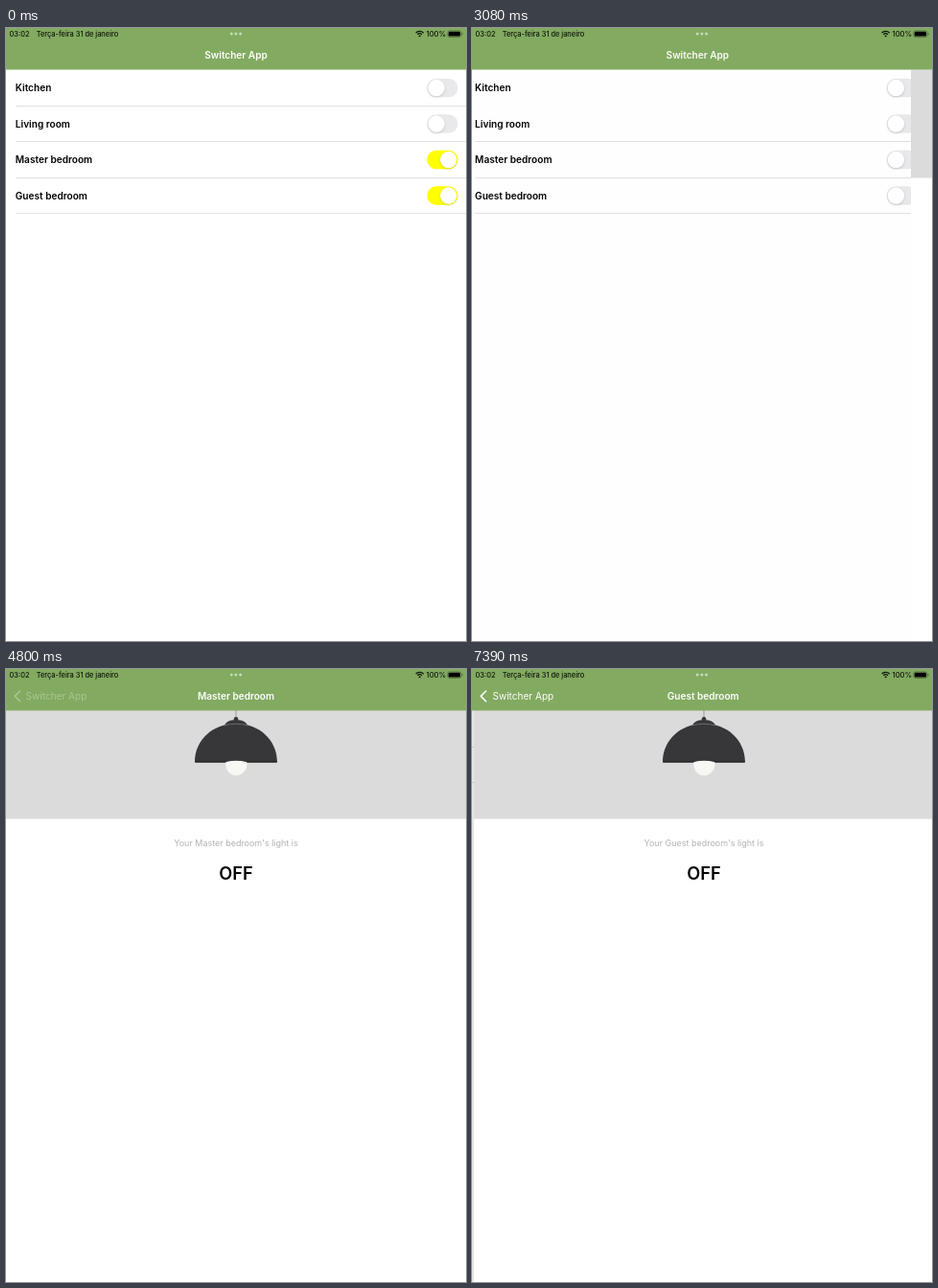
An HTML page with a canvas that plays this animation: 480x640 px, repeating every 8000 ms.

```html
<!DOCTYPE html>
<html lang="en">
<head>
<meta charset="utf-8">
<title>Switcher App</title>
<style>
html, body { margin: 0; width: 100%; height: 100%; overflow: hidden; background: #fff; }
canvas { display: block; width: 480px; height: 640px; }
</style>
</head>
<body>
<canvas id="stage"></canvas>
<script>
const W = 480, H = 640, LOOP = 8000, BAR = 43.5, ROW = 37.5;
const FONT = 'Inter, Roboto, sans-serif';
const GREEN = '#82aa60';
const rooms = ['Kitchen', 'Living room', 'Master bedroom', 'Guest bedroom'];
const startsOn = [0, 0, 1, 1];

const ticks = [0, 500, 620, 740, 860, 1090, 1200, 1310, 1420, 1530, 1640,
  1790, 1910, 2010, 2120, 2220, 2740, 2850, 2960, 3070, 3190, 3300,
  3570, 3690, 3790, 3900, 4010, 4120, 4800, 4950, 5060, 5180, 5290, 5410,
  5860, 5960, 6070, 6180, 6290, 6390, 6500, 6600, 6930, 7040, 7160, 7270, 7390];

const visits = [
  { room: 0, select: 1790, push: 1786, tap: 2740, pop: 2800, end: 3300 },
  { room: 2, select: 3570, push: 3605, tap: 4800, pop: 4900, end: 5410 },
  { room: 3, select: 6930, push: 6960, tap: 9e3, pop: 9e3, end: 9e3 }
];

const toggles = [
  { row: 3, touch: 460, slide: 580, on: 0 },
  { row: 2, touch: 1050, slide: 1270, on: 0 },
  { row: 2, touch: 5860, slide: 6240, on: 1 }
];

const canvas = document.getElementById('stage');
const ctx = canvas.getContext('2d');
const dpr = window.devicePixelRatio || 1;
canvas.width = W * dpr;
canvas.height = H * dpr;

const clamp = v => Math.max(0, Math.min(1, v));
const smooth = v => { v = clamp(v); return v * v * (3 - 2 * v); };
const mix = (a, b, k) => a + (b - a) * k;

function spring(ms) {
  if (ms <= 0) return 0;
  const w = ms * 0.0179;
  const v = 1 - (1 + w) * Math.exp(-w);
  return v > 0.9985 ? 1 : v;
}

function text(str, x, y, size, weight, color, align = 'left', alpha = 1) {
  ctx.save();
  ctx.globalAlpha = clamp(alpha);
  ctx.font = `${weight} ${size}px ${FONT}`;
  ctx.textAlign = align;
  ctx.fillStyle = color;
  ctx.fillText(str, x, y);
  ctx.restore();
}

function rect(x, y, w, h, color) {
  ctx.fillStyle = color;
  ctx.fillRect(x, y, w, h);
}

function pill(x, y, w, h, r, color) {
  ctx.beginPath();
  ctx.roundRect(x, y, w, h, r);
  ctx.fillStyle = color;
  ctx.fill();
}

function switchState(row, t) {
  let on = startsOn[row], stretch = 0;
  for (const g of toggles) {
    if (g.row !== row || t < g.touch) continue;
    on = mix(on, g.on, smooth((t - g.slide) / 260));
    stretch = clamp((t - g.touch) / 120) * (1 - smooth((t - g.slide - 100) / 160));
  }
  return { on, stretch };
}

function drawSwitch(cy, { on, stretch }) {
  const x = 439.3, w = 32.2, h = 19.6, d = 17.4, pad = 1.1;
  const c = [mix(233, 255, on), mix(233, 255, on), mix(235, 0, on)].map(Math.round);
  pill(x, cy - h / 2, w, h, h / 2, `rgb(${c})`);
  const kw = d + 4 * stretch;
  ctx.save();
  ctx.shadowColor = 'rgba(0,0,0,.16)';
  ctx.shadowBlur = 2.5 * dpr;
  ctx.shadowOffsetY = 1 * dpr;
  pill(mix(x + pad, x + w - pad - kw, on), cy - d / 2, kw, d, d / 2, '#fff');
  ctx.restore();
}

function hiddenLines(t) {
  const v = visits.find(v => t >= v.select && t < v.end);
  const row = v ? v.room : t >= 5860 && t < 6930 ? 2 : -9;
  return [row - 1, row];
}

function drawList(t, p) {
  const hidden = hiddenLines(t);
  ctx.save();
  ctx.translate(-0.3 * W * p, 0);
  rooms.forEach((name, i) => {
    const cy = BAR + ROW * (i + 0.5) + 0.3;
    text(name, 9.8, cy + 3.6, 10.1, 600, '#000');
    drawSwitch(cy, switchState(i, t));
    if (!hidden.includes(i)) rect(10, Math.floor(BAR + ROW * (i + 1)), W + 150, 1, '#e0e0e0');
  });
  ctx.restore();
  if (p > 0) rect(0, BAR, W, H, `rgba(0,0,0,${0.1 * p})`);
}

function drawLamp() {
  rect(239.6, 43, 0.8, 8, '#8a8a8a');
  ctx.fillStyle = '#37373a';
  ctx.beginPath();
  ctx.arc(240, 52.3, 2.3, 0, 7);
  ctx.fill();
  ctx.beginPath();
  ctx.moveTo(228, 58.5);
  ctx.quadraticCurveTo(231, 53.4, 237, 53.2);
  ctx.lineTo(243, 53.2);
  ctx.quadraticCurveTo(249, 53.4, 252, 58.5);
  ctx.fill();

  // bulb, then the shade over its top
  ctx.beginPath();
  ctx.moveTo(229.4, 95);
  ctx.bezierCurveTo(228, 106, 234, 111.3, 240, 111.3);
  ctx.bezierCurveTo(246, 111.3, 253, 106, 251.4, 95);
  ctx.fillStyle = '#f7f7f3';
  ctx.fill();

  ctx.beginPath();
  ctx.moveTo(197, 97.2);
  ctx.bezierCurveTo(197, 74, 216, 57, 240, 57);
  ctx.bezierCurveTo(264, 57, 283, 74, 283, 97.2);
  ctx.lineTo(251.5, 97.2);
  ctx.quadraticCurveTo(240, 94.5, 229, 97.2);
  ctx.fillStyle = '#37373a';
  ctx.fill();
  ctx.beginPath();
  ctx.moveTo(227, 59);
  ctx.quadraticCurveTo(240, 55.6, 253, 59);
  ctx.strokeStyle = '#77777a';
  ctx.lineWidth = 0.8;
  ctx.stroke();
  rect(197.3, 96.2, 32, 1.5, '#252527');
  rect(251.3, 96.2, 31.4, 1.5, '#252527');
}

function drawDetail(name, x) {
  ctx.save();
  ctx.translate(x, 0);
  rect(0, BAR, W, H, '#fff');
  rect(0, BAR, W, 113, '#dbdbdb');
  drawLamp();
  text(`Your ${name}'s light is`, 240, 184.7, 8.97, 400, '#b3b3b3', 'center');
  text('OFF', 240, 220.4, 18.2, 600, '#000', 'center');
  ctx.restore();
}

function drawStatus() {
  text('03:02', 3.6, 8.8, 7.4, 500, '#10150c');
  text('Terça-feira 31 de janeiro', 31.7, 8.8, 7.4, 500, '#10150c');
  text('100%', 459.2, 8.8, 7.7, 500, '#10150c', 'right');

  ctx.fillStyle = '#c6dab7';
  for (const x of [235.2, 239.9, 244.6]) {
    ctx.beginPath();
    ctx.arc(x, 6, 1.5, 0, 7);
    ctx.fill();
  }

  ctx.strokeStyle = ctx.fillStyle = '#10150c';
  ctx.lineWidth = 1.3;
  for (const r of [3.2, 5.6]) {
    ctx.beginPath();
    ctx.arc(431.7, 9, r, -Math.PI * 0.76, -Math.PI * 0.24);
    ctx.stroke();
  }
  ctx.beginPath();
  ctx.moveTo(431.7, 9.5);
  ctx.arc(431.7, 9.3, 1.7, -Math.PI * 0.78, -Math.PI * 0.22);
  ctx.fill();

  ctx.beginPath();
  ctx.roundRect(460.8, 2.9, 14, 6.6, 2);
  ctx.lineWidth = 0.6;
  ctx.strokeStyle = '#45592f';
  ctx.stroke();
  pill(461.7, 3.8, 12.2, 4.8, 1.2, '#000');
  pill(475.5, 5, 0.9, 2.4, 0.5, '#45592f');
}

function drawBar(name, p, pressed) {
  rect(0, 0, W, BAR, GREEN);
  drawStatus();
  const k = Math.pow(p, 1.2);
  const shift = 186.5 * k;
  text('Switcher App', 240 - shift, 31.8, 10.07, 600, '#fff', 'center', 1 - p);
  if (p <= 0) return;

  const alpha = p * (pressed ? 0.32 : 1);
  text('Switcher App', 20.6 + 186.5 * (1 - k), 31.8, 10.07, 400, '#fff', 'left', alpha);
  text(name, 240 + 302 * (1 - p), 31.8, 10.07, 600, '#fff', 'center', Math.pow(p, 1.7));
  ctx.save();
  ctx.globalAlpha = pressed ? alpha : Math.sqrt(p);
  ctx.beginPath();
  ctx.moveTo(14.6, 23);
  ctx.lineTo(9.2, 28.4);
  ctx.lineTo(14.6, 33.8);
  ctx.strokeStyle = '#fff';
  ctx.lineWidth = 1.6;
  ctx.lineCap = ctx.lineJoin = 'round';
  ctx.stroke();
  ctx.restore();
}

function draw(t) {
  ctx.setTransform(dpr, 0, 0, dpr, 0, 0);
  rect(0, 0, W, H, '#fff');
  const v = visits.find(v => t >= v.push && t < v.end);
  const p = v ? spring(t - v.push) * (1 - spring(t - v.pop)) : 0;
  const name = v ? rooms[v.room] : '';
  drawList(t, p);
  if (p > 0) drawDetail(name, Math.round(W * (1 - p)));
  drawBar(name, p, v && t >= v.tap);
}

function frame() {
  const now = performance.now() % LOOP;
  let t = 0;
  for (const k of ticks) if (k <= now) t = k;
  draw(t);
  requestAnimationFrame(frame);
}
frame();
</script>
</body>
</html>
```
